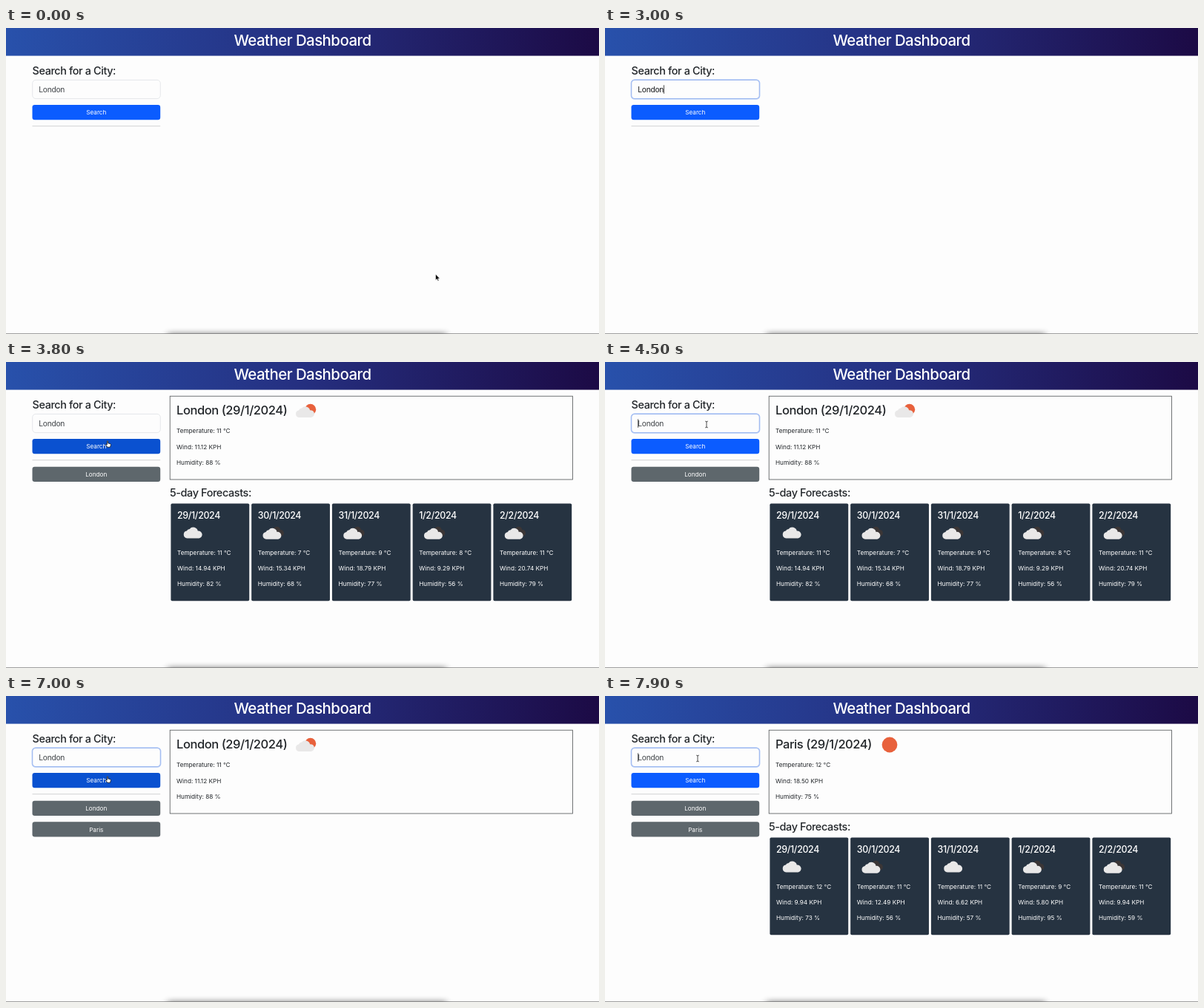
An HTML page that plays this animation: 800 px wide and 414 px high, repeating every 8000 ms.

```html
<!DOCTYPE html>
<html lang="en">
<head>
<meta charset="utf-8">
<title>Weather Dashboard</title>
<style>
html, body { margin: 0; width: 100%; height: 100%; overflow: hidden; background: #fdfdfd; }
svg { display: block; width: 800px; height: 414px; }
text { font: 8.2px Inter, sans-serif; fill: #212529; white-space: pre; }
.h { font-weight: 500; letter-spacing: -.026em; }
.mid { text-anchor: middle; }
.light { fill: #fff; }
.field { font-size: 10.3px; letter-spacing: -.03em; }
</style>
</head>
<body>
<svg id="stage" viewBox="0 0 800 414">
  <defs>
    <linearGradient id="bar">
      <stop offset="0" stop-color="#2851ab"/>
      <stop offset=".5" stop-color="#252f80"/>
      <stop offset="1" stop-color="#1c0a45"/>
    </linearGradient>
    <filter id="soft" x="-20%" y="-400%" width="140%" height="900%"><feGaussianBlur stdDeviation="5"/></filter>
    <path id="cloud" d="M5 17.5a5 5 0 0 1-.6-9.9A4.2 4.2 0 0 1 8.3 5 6.3 6.3 0 0 1 19.4 7.6 5 5 0 0 1 21 17.5Z"/>
  </defs>
</svg>
<script>
const LOOP = 8000;
const stage = document.getElementById('stage');

function add(tag, attrs, parent = stage) {
  const node = document.createElementNS('http://www.w3.org/2000/svg', tag);
  for (const key in attrs) node.setAttribute(key, attrs[key]);
  parent.append(node);
  return node;
}
const box = (x, y, width, height, fill, rx = 0, parent) => add('rect', { x, y, width, height, fill, rx }, parent);
function label(x, y, str, cls = '', size, parent) {
  const node = add('text', { x, y, class: cls }, parent);
  if (size) node.style.fontSize = size + 'px';
  node.textContent = str;
  return node;
}
const group = (parent) => add('g', {}, parent);
const show = (node, on) => { node.style.display = on ? '' : 'none'; };

// Page frame
box(0, 0, 800, 414, '#fdfdfd');
box(0, 0, 800, 37.6, 'url(#bar)');
label(400, 24, 'Weather Dashboard', 'h mid light', 20.4);
add('rect', { x: 218, y: 415, width: 376, height: 10, fill: '#000', opacity: .75, filter: 'url(#soft)' });
box(0, 413.3, 800, .7, '#777');

// Search form
label(35.5, 62.5, 'Search for a City:', 'h', 14.4);
const ring = add('rect', { x: 34.6, y: 69.2, width: 174.8, height: 27.6, rx: 5.4, fill: '#b9cffb' });
add('rect', { x: 35.7, y: 70.4, width: 172.6, height: 25.2, rx: 4.4, fill: '#fdfdfd', stroke: '#dcdfe3', 'stroke-width': .7 });
const edge = add('rect', { x: 35.7, y: 70.4, width: 172.6, height: 25.2, rx: 4.4, fill: 'none', stroke: '#86a9f2', 'stroke-width': .8 });
const field = label(44.3, 87, '', 'field');
const caret = box(44.3, 77.3, .8, 11.5, '#222');
const button = box(35.5, 104, 172.7, 20.2, '#0b5cff', 3.2);
label(121.8, 117.2, 'Search', 'mid light');
box(35.5, 132.4, 172.7, .8, '#c6c7c8');

const saved = ['London', 'Paris'].map((city, i) => {
  const g = group();
  box(35.5, 141.7 + 28.6 * i, 172.7, 20.2, '#5e676c', 3.2, g);
  label(121.8, 154.9 + 28.6 * i, city, 'mid light', 0, g);
  return g;
});

// Weather results
const days = ['29/1/2024', '30/1/2024', '31/1/2024', '1/2/2024', '2/2/2024'];
const readings = (temp, wind, humid) => [`Temperature: ${temp} °C`, `Wind: ${wind} KPH`, `Humidity: ${humid} %`];

function cloud(x, y, dark, parent) {
  if (dark) add('use', { href: '#cloud', fill: '#3b3636', transform: `translate(${x + 8.5} ${y - 1.8}) scale(.8 .85)` }, parent);
  add('use', { href: '#cloud', fill: '#e9e8e8', transform: `translate(${x} ${y})` }, parent);
}

function panel(city, now, loaded, sunny) {
  const g = group();
  const shift = loaded ? 0 : -19;
  add('rect', { x: 221.2, y: 46.2, width: 543.2, height: 112.8 + shift, fill: 'none', stroke: '#4d5053', 'stroke-width': .8 }, g);
  label(230, 71.3, `${city} (29/1/2024)`, 'h', 16.5, g);
  readings(...now).forEach((line, i) => label(i || loaded ? 230 : 382.5 - (city === 'Paris' ? 20 : 0), 96.3 + 21.2 * i + shift, line, '', 0, g));
  if (loaded && sunny) add('circle', { cx: 384, cy: 66, r: 10.4, fill: '#e8613c' }, g);
  else if (loaded) {
    add('circle', { cx: 410.7, cy: 64.2, r: 7.5, fill: '#e8613c' }, g);
    cloud(390.7, 57.6, false, g);
  }
  return g;
}

function forecast(list) {
  const g = group();
  label(221, 182, '5-day Forecasts:', 'h', 14.4, g);
  list.forEach(([dark, ...values], i) => {
    const x = 222.4 + 108.75 * i;
    box(x, 191.4, 105.8, 131.8, '#263341', 1.8, g);
    label(x + 8.6, 212, days[i], 'h light', 12.4, g);
    cloud(x + (dark ? 15 : 17), dark ? 222.3 : 221, dark, g);
    readings(...values).forEach((line, k) => label(x + 8.6, 260.6 + 21.2 * k, line, 'light', 0, g));
  });
  return g;
}

const reports = [
  ['London', [11, '11.12', 88], 0, [[0, 11, '14.94', 82], [1, 7, '15.34', 68], [1, 9, '18.79', 77], [1, 8, '9.29', 56], [1, 11, '20.74', 79]]],
  ['Paris', [12, '18.50', 75], 1, [[0, 12, '9.94', 73], [1, 11, '12.49', 56], [0, 11, '6.62', 57], [1, 9, '5.80', 95], [1, 11, '9.94', 59]]]
].map(([city, now, sunny, list]) => ({
  partial: panel(city, now, false, sunny),
  full: panel(city, now, true, sunny),
  cards: forecast(list)
}));

// Pointers, each with its hot spot at 0,0
const pointers = {
  arrow: add('path', { d: 'M0 0V8.2L1.9 6.5 3.2 9.3 4.5 8.7 3.3 6H5.8Z', fill: '#000', stroke: '#fff', 'stroke-width': .6 }),
  hand: add('path', { d: 'M-.7.6Q0-.5.7.6V3.4L3.9 4.2Q4.6 4.6 4.3 6L3.6 8.7H-.2L-2.6 5.4Q-2.4 4.4-.7 5.4Z', fill: '#fff', stroke: '#111', 'stroke-width': .8 }),
  beam: add('path', { d: 'M-1.8-4.3Q0-4.3 0-3.3 0-4.3 1.8-4.3M0-3.5V3.5M-1.8 4.3Q0 4.3 0 3.3 0 4.3 1.8 4.3', fill: 'none', stroke: '#222', 'stroke-width': .8 })
};

// Timeline: [start, value]
const path = [[0, 579.5, 333], [150, 579.5, 333], [950, 150, 84], [3050, 150, 84], [3400, 137, 106.5], [3900, 137, 106.5],
  [4250, 137, 84.5], [6300, 137, 84.5], [6700, 137, 108.5], [7400, 137, 108.5], [7700, 125, 84.5], [8000, 125, 84.5]];
const typing = [[0, ''], [1800, 'L'], [1950, 'Lo'], [2100, 'Lon'], [2200, 'Lond'], [2500, 'Londo'], [2700, 'London'], [3500, ''],
  [5200, 'P'], [5500, 'Pa'], [5700, 'Par'], [5950, 'Pari'], [6200, 'Paris'], [7000, '']];
const focus = [[0, 0], [1100, 1], [3500, 0], [4300, 1], [7000, 0], [7750, 1]];
const result = [[0, ''], [3600, 'partial 0'], [3800, 'full 0 cards'], [7000, 'full 0'], [7200, 'partial 1'], [7350, 'full 1 cards']];
const hidden = [[0, 0], [1800, 1], [3050, 0], [5200, 1], [6300, 0]];

const at = (steps, t) => steps.findLast(step => step[0] <= t);

function pointerAt(t) {
  const i = path.findLastIndex(p => p[0] <= t);
  const [t0, x0, y0] = path[i], [t1, x1, y1] = path[i + 1];
  const k = (t - t0) / (t1 - t0), ease = k * k * (3 - 2 * k);
  return [x0 + (x1 - x0) * ease, y0 + (y1 - y0) * ease];
}

function render(t) {
  const [x, y] = pointerAt(t);
  const inside = (top, bottom) => x > 35 && x < 209 && y > top && y < bottom;
  const kind = inside(104, 124) ? 'hand' : inside(70, 96) ? 'beam' : 'arrow';
  for (const name in pointers) {
    show(pointers[name], name === kind && !at(hidden, t)[1]);
    pointers[name].setAttribute('transform', `translate(${x} ${y})`);
  }
  button.setAttribute('fill', kind === 'hand' ? '#0a51d0' : '#0b5cff');

  const [since, on] = at(focus, t);
  const fade = Math.min(1, (t - since) / 150);
  ring.style.opacity = edge.style.opacity = on ? fade : since ? 1 - fade : 0;

  const [keyed, value] = at(typing, t);
  field.textContent = value || 'London';
  field.style.fill = value ? '#16181b' : '#414549';
  caret.setAttribute('x', 44.3 + (value ? field.getComputedTextLength() : 0));
  show(caret, on && (t - Math.max(keyed, since)) % 1000 < 500);

  show(saved[0], t >= 3500);
  show(saved[1], t >= 7000);
  const [mode, index, cards] = at(result, t)[1].split(' ');
  reports.forEach((report, i) => {
    const current = mode && i === +index;
    show(report.partial, current && mode === 'partial');
    show(report.full, current && mode === 'full');
    show(report.cards, current && cards);
  });
}

function tick() {
  render(performance.now() % LOOP);
  requestAnimationFrame(tick);
}
tick();
</script>
</body>
</html>
```
